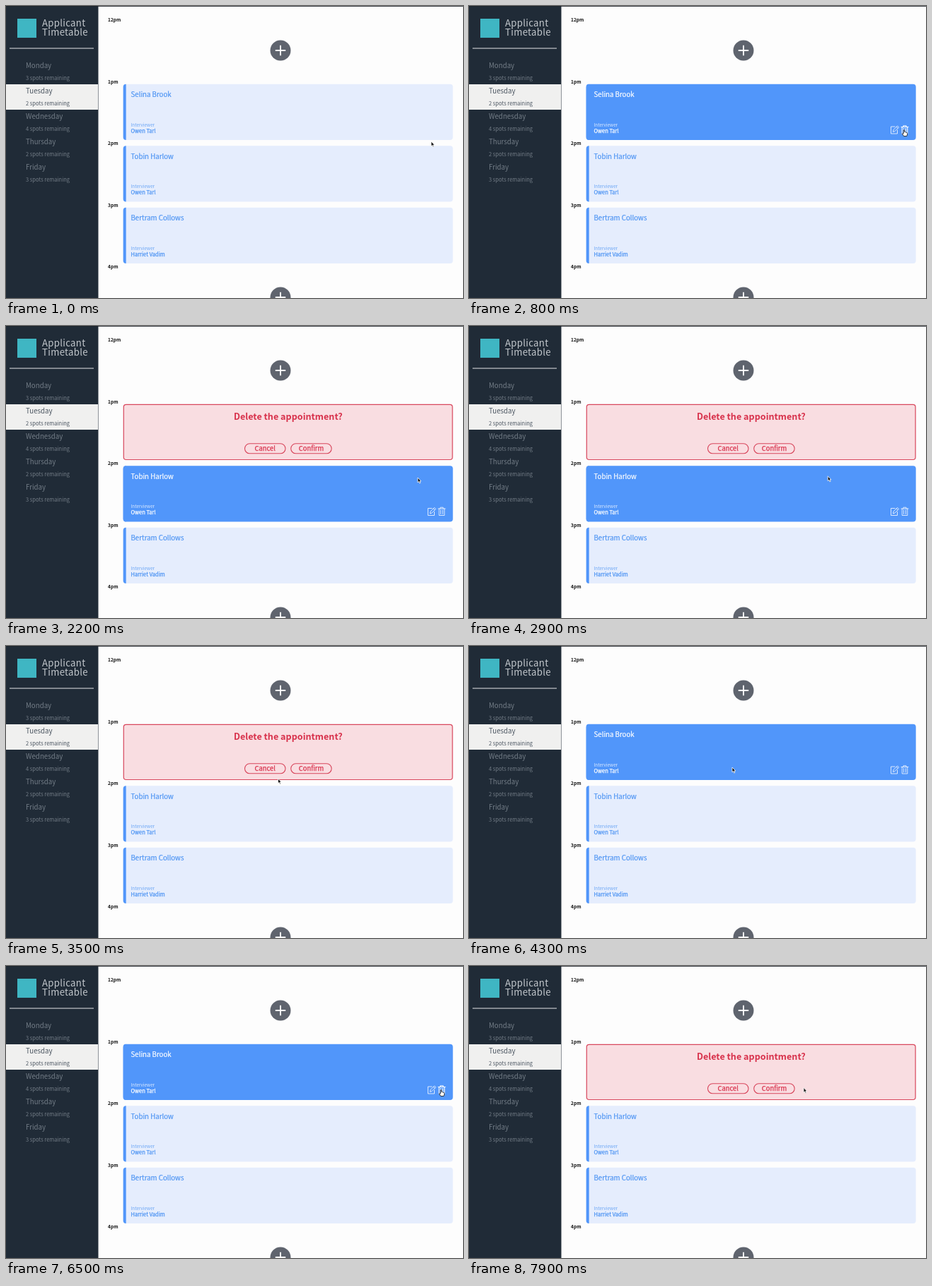
These frames come from a looping animation (646x414 px, 8000 ms). An HTML page:

```html
<!DOCTYPE html>
<html lang="en">
<head>
<meta charset="utf-8">
<title>Appointments</title>
<style>
html, body { margin: 0; width: 100%; height: 100%; overflow: hidden; background: #fdfdfd; }
svg { display: block; width: 100vw; height: 100vh; }
text { font-family: "Noto Sans CJK JP", "Noto Sans CJK SC", "Noto Sans CJK", "Noto Sans", sans-serif; }
.brand { font-size: 13.2px; font-weight: 300; letter-spacing: .3px; fill: #c3c8cd; }
.day { font-size: 9.7px; font-weight: 300; fill: #737d87; }
.spots { font-size: 7.5px; font-weight: 300; fill: #737d87; }
.selected text { fill: #4b5560; }
.hour { font-size: 6.6px; font-weight: 700; fill: #111; }
.name { font-size: 9.7px; stroke-width: .2; }
.label { font-size: 6.3px; font-weight: 300; opacity: .8; }
.interviewer { font-size: 7.5px; stroke-width: .25; }
.card text { fill: #4d94f3; }
.card .name, .card .interviewer { stroke: #4d94f3; }
.face { fill: #e5edfd; }
.strip { fill: #5196fa; }
.hover .face { fill: #5196fa; }
.card.hover text { fill: #fff; }
.card.hover .name, .card.hover .interviewer { stroke: #fff; }
.icons { display: none; fill: none; stroke: #fff; stroke-width: 1; stroke-linejoin: round; stroke-linecap: round; }
.hover .icons { display: inline; }
.icons path { opacity: .78; }
.icons path.active { opacity: 1; stroke-width: 1.15; }
.confirm text { fill: #d8324c; text-anchor: middle; }
.confirm rect { fill: #f9dde1; stroke: #d8465c; }
.question { font-size: 12.6px; font-weight: 700; }
.button { font-size: 9.4px; stroke: #d8324c; stroke-width: .25; }
.cursor { stroke: #fff; stroke-width: .8; stroke-linejoin: round; fill: #111; }
</style>
</head>
<body>
<svg id="stage" viewBox="0 0 646 414" preserveAspectRatio="none"></svg>
<script>
const LOOP = 8000, STEP = 100;
const CARD_LEFT = 165.7, CARD_TOP = 110.8, CARD_WIDTH = 466, CARD_HEIGHT = 79.3, PITCH = 87.5;

const days = [["Monday", 3], ["Tuesday", 2], ["Wednesday", 4], ["Thursday", 2], ["Friday", 3]];
const hours = ["12pm", "1pm", "2pm", "3pm", "4pm"];
const bookings = [
  ["Selina Brook", "Owen Tarl"],
  ["Tobin Harlow", "Owen Tarl"],
  ["Bertram Collows", "Harriet Vadim"]
];

// Pointer tip: time, x, y
const pointerPath = [
  [0, 601, 192], [200, 603, 188], [500, 611, 179], [800, 615, 175.5],
  [1800, 615, 175.5], [2000, 604, 193], [2200, 582, 215], [2300, 576, 220],
  [2500, 576, 220], [3000, 490, 211], [3400, 396, 199], [3500, 384.5, 188],
  [4000, 372, 172], [4700, 372, 172], [5100, 402.5, 181], [5600, 486, 180],
  [6200, 594, 177], [6500, 615, 175.5], [7500, 615, 175.5], [7700, 561, 174], [7900, 473, 172.5]
];
const asking = t => (t >= 1600 && t < 4300) || t >= 7000;

const text = (cls, x, y, content) => `<text class="${cls}" x="${x}" y="${y}">${content}</text>`;

const dayRow = ([day, spots], i) => `
  <g transform="translate(0 ${75 + 36 * i})" class="${i === 1 ? "selected" : ""}">
    ${i === 1 ? '<rect width="130" height="36" fill="#f0f0ef"/>' : ""}
    ${text("day", 28, 13, day)}${text("spots", 28, 30, spots + " spots remaining")}
  </g>`;

const addButton = y => `
  <g transform="translate(388 ${y})">
    <circle r="14.5" fill="#5f646e"/>
    <path d="M-7.2 0H7.2M0-7.2V7.2" stroke="#fff" stroke-width="1.8"/>
  </g>`;

const card = ([name, interviewer], i) => `
  <g class="card" transform="translate(${CARD_LEFT} ${CARD_TOP + PITCH * i})">
    <rect class="face" width="${CARD_WIDTH}" height="${CARD_HEIGHT}" rx="4"/>
    <path class="strip" d="M4 0V${CARD_HEIGHT}a4 4 0 0 1-4-4V4a4 4 0 0 1 4-4Z"/>
    ${text("name", 10.8, 18.6, name)}
    ${text("label", 10.8, 60.2, "Interviewer")}
    ${text("interviewer", 10.8, 69.2, interviewer)}
    <g class="icons" transform="translate(.3 .2)">
      <path d="M436 60H430.5V70H439.5V65M433.5 67l.6-2.6 5.5-5.5 2 2-5.5 5.5zM438.2 60.3l2 2"/>
      <path d="M445 60.5H455M448 60.5V58.7H452V60.5M446.2 60.5V70H453.8V60.5M448.6 62.5V68M451.4 62.5V68"/>
    </g>
  </g>`;

const pill = (x, label) => `
  <rect x="${x}" y="166.8" width="57.5" height="14" rx="7" stroke-width="1.1"/>
  ${text("button", x + 28.75, 177.2, label)}`;

document.getElementById("stage").innerHTML = `
  <rect width="646" height="414" fill="#fdfdfd"/>
  <rect width="130.5" height="414" fill="#202b37"/>
  <rect x="16" y="18" width="27" height="27" fill="#3fb6c3"/>
  ${text("brand", 51, 29, "Applicant")}${text("brand", 51, 42, "Timetable")}
  <path d="M5 60H124" stroke="#e4e6e8" stroke-width="1.2"/>
  ${days.map(dayRow).join("")}
  ${hours.map((hour, i) => text("hour", 144, 22 + PITCH * i, hour)).join("")}
  ${addButton(63)}${addButton(413)}
  ${bookings.map(card).join("")}
  <g class="confirm">
    <rect x="${CARD_LEFT + .6}" y="${CARD_TOP + .6}" width="${CARD_WIDTH - 1.2}" height="${CARD_HEIGHT - 1.2}"
      rx="3.5" stroke-width="1.2"/>
    ${text("question", 398.8, 133, "Delete the appointment?")}
    ${pill(337.5, "Cancel")}${pill(402.7, "Confirm")}
  </g>
  <rect width="646" height="1" fill="#1b2027" opacity=".8"/>
  <g class="cursor">
    <path d="M0 0V6.8L1.6 5.4 2.7 8 3.9 7.5 2.8 5H4.8Z"/>
    <path fill="#fff" stroke="#111"
      d="M-.8 .5Q0-.6 .8 .5V3.2Q1.7 2.7 2.2 3.5 3.1 3.2 3.5 4 4.6 3.8 4.6 5V6.5L3.8 9H-.4L-2.7 5.5Q-2.4 4.3-.8 5.6Z"/>
  </g>`;

const cards = [...document.querySelectorAll(".card")];
const confirmPanel = document.querySelector(".confirm");
const cursor = document.querySelector(".cursor");
const [arrow, hand] = cursor.children;
const show = (element, visible) => element.style.display = visible ? "inline" : "none";

function pointerAt(t) {
  const next = pointerPath.findIndex(key => key[0] > t);
  if (next < 0) return pointerPath.at(-1).slice(1);
  const [t0, x0, y0] = pointerPath[next - 1], [t1, x1, y1] = pointerPath[next];
  const p = (t - t0) / (t1 - t0);
  return [x0 + (x1 - x0) * p, y0 + (y1 - y0) * p];
}

function draw(now) {
  const t = Math.floor(now % LOOP / STEP) * STEP;
  const [x, y] = pointerAt(t), open = asking(t);
  const within = (left, right, top, bottom) => x >= left && x <= right && y >= top && y <= bottom;
  let overControl = open && (within(337, 395, 167, 181) || within(402, 460, 167, 181));

  cards.forEach((element, i) => {
    const top = CARD_TOP + PITCH * i;
    const hovered = within(CARD_LEFT, CARD_LEFT + CARD_WIDTH, top, top + CARD_HEIGHT) && !(open && i === 0);
    element.classList.toggle("hover", hovered);
    element.querySelectorAll(".icons path").forEach((icon, k) => {
      const active = hovered && within(595 + 15 * k, 607 + 15 * k, top + 57, top + 71);
      icon.classList.toggle("active", active);
      overControl ||= active;
    });
  });
  show(cards[0], !open);
  show(confirmPanel, open);
  show(arrow, !overControl);
  show(hand, overControl);
  cursor.setAttribute("transform", `translate(${x} ${y})`);
}

const start = performance.now();
function tick() {
  draw(performance.now() - start);
  requestAnimationFrame(tick);
}
tick();
</script>
</body>
</html>
```
